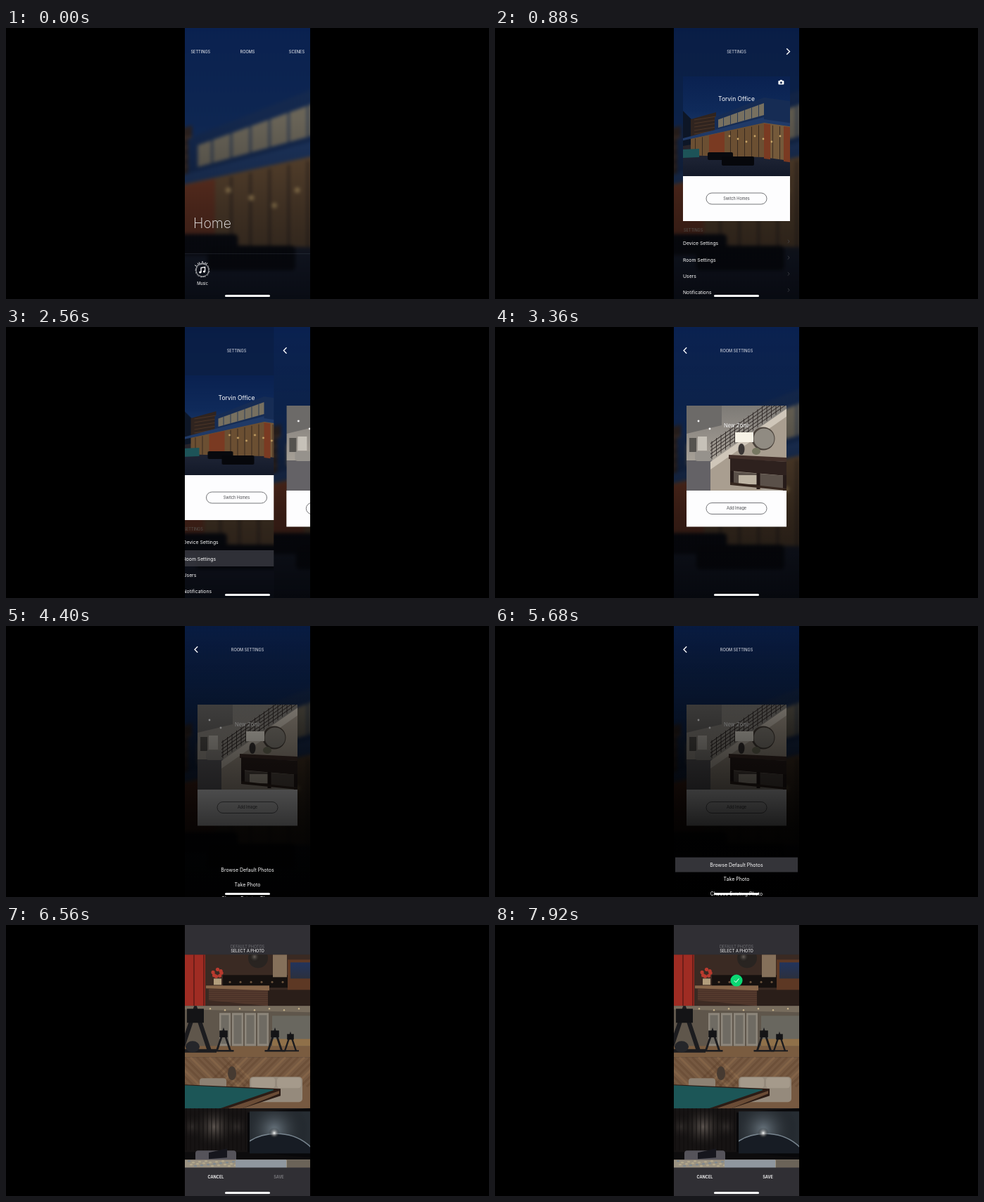
Animation, 686 px wide and 386 px high, one loop 8 s. Source, as an HTML page with a canvas:

```html
<!DOCTYPE html>
<html lang="en">
<head>
<meta charset="utf-8">
<title>Room photo setup</title>
<style>
html, body { margin: 0; width: 100%; height: 100%; overflow: hidden; background: #000; }
canvas { display: block; width: 686px; height: 386px; }
</style>
</head>
<body>
<canvas id="stage"></canvas>
<script>
const W = 686, H = 386, LOOP = 8000;
const L = 254, R = 432, PW = R - L, MID = 343;
const BAND = 73, PANEL = '#302f34';
const dpr = window.devicePixelRatio || 1;
const FONT = 'Inter, "Open Sans", sans-serif';

function surface(el) {
  el.width = W * dpr;
  el.height = H * dpr;
  const c = el.getContext('2d');
  c.scale(dpr, dpr);
  return c;
}
const view = surface(document.getElementById('stage'));
let g = view;

// Drawing helpers
const repeat = (n, fn) => { for (let i = 0; i < n; i++) fn(i); };

function rect(fill, x, y, w, h) {
  g.fillStyle = fill;
  g.fillRect(x, y, w, h);
}
// Upright-sided quad: top edge a0..a1, bottom edge b0..b1
function slab(fill, x0, x1, a0, a1, b0, b1) {
  g.fillStyle = fill;
  g.beginPath();
  g.moveTo(x0, a0);
  g.lineTo(x1, a1);
  g.lineTo(x1, b1);
  g.lineTo(x0, b0);
  g.fill();
}
function disc(fill, x, y, rx, ry = rx) {
  g.fillStyle = fill;
  g.beginPath();
  g.ellipse(x, y, rx, ry, 0, 0, 7);
  g.fill();
}
function line(color, width, ...p) {
  g.strokeStyle = color;
  g.lineWidth = width;
  g.beginPath();
  for (let i = 0; i < p.length; i += 2) g.lineTo(p[i], p[i + 1]);
  g.stroke();
}
function box(fill, x, y, w, h, r) {
  g.fillStyle = fill;
  g.beginPath();
  g.roundRect(x, y, w, h, r);
  g.fill();
}
function fade(y0, y1, ...stops) {
  const f = g.createLinearGradient(0, y0, 0, y1);
  stops.forEach((s, i) => f.addColorStop(i / (stops.length - 1), s));
  return f;
}
function glow(x, y, r, color) {
  const f = g.createRadialGradient(x, y, 0, x, y, r);
  f.addColorStop(0, color);
  f.addColorStop(1, 'rgba(0,0,0,0)');
  rect(f, x - r, y - r, 2 * r, 2 * r);
}
function text(str, x, y, size, color = '#fff', align = 'center', weight = 400) {
  g.font = `${weight} ${size}px ${FONT}`;
  g.textAlign = align;
  g.fillStyle = color;
  g.fillText(str, x, y + size * 0.36);
}
function clipped(x, y, w, h, paint) {
  g.save();
  g.beginPath();
  g.rect(x, y, w, h);
  g.clip();
  paint();
  g.restore();
}
function shifted(dx, dy, paint) {
  g.save();
  g.translate(dx, dy);
  paint();
  g.restore();
}
const put = (img) => g.drawImage(img, 0, 0, W, H);

function offscreen(paint) {
  const el = document.createElement('canvas');
  const outer = g;
  g = surface(el);
  paint();
  g = outer;
  return el;
}
function soft(blur, paint) {
  const sharp = offscreen(paint);
  return offscreen(() => {
    put(sharp);
    g.filter = `blur(${blur * dpr}px)`;
    put(sharp);
  });
}

// House: heights are given at the corner, edges run to the vanishing points
const CORNER = 382;
function edge(x, y) {
  const slope = x < CORNER ? 0.005 * (y - 99) - 0.4 : 0.14;
  return y + (x - CORNER) * slope;
}
function wall(fill, x0, x1, y0, y1) {
  slab(fill, x0, x1, edge(x0, y0), edge(x1, y0), edge(x0, y1), edge(x1, y1));
}
function house() {
  rect(fade(69, 165, '#0a2150', '#0f2a5a', '#223f70'), 267, 69, 152, 100);
  rect(fade(165, 211, '#2a2428', '#1c2233', '#131928'), 267, 165, 152, 46);
  slab('#0d1626', 267, 279, 118, 130, 168, 166);
  slab('#30241f', 278, 314, 130, 120, 160, 150);
  repeat(5, (i) => line('#553b2a', 0.8, 283, 131 + i * 5, 314, 126 + i * 5));
  wall('#6b4f32', 278, CORNER, 134, 184);
  wall('#74593a', CORNER, 419, 134, 184);
  wall('#162c54', 312, CORNER, 99, 134);
  wall('#162c54', CORNER, 419, 99, 132);
  wall('#777060', 317, CORNER, 107, 124);
  repeat(6, (i) => wall('#2a3a54', 324 + i * 10, 325 + i * 10, 107, 124));
  repeat(14, (i) => wall('#382a20', 284 + i * 10, 285 + i * 10, 137, 184));
  [304, CORNER, 410].forEach((x) => wall('#7a3a22', x, x + (x < CORNER ? 22 : 9), 136, 186));
  repeat(7, (i) => disc('#c9a567', 333 + i * 12, 154 + i % 3 * 4, 1.4));
  wall('#203a67', 267, CORNER, 127, 135);
  wall('#203a67', CORNER, 419, 130, 135);
  slab('#1d5358', 267, 290, 173, 172, 185, 184);
  box('#08090e', 302, 177, 36, 11, 2);
  box('#06070b', 322, 183, 46, 13, 2);
}
// The page backdrop is the same picture, enlarged and dimmed
function backdrop() {
  const zoom = H / 142;
  g.save();
  g.translate(MID, 0);
  g.scale(zoom, zoom);
  g.translate(-MID, -69);
  house();
  g.restore();
  rect(fade(0, H, 'rgba(0,0,0,0)', 'rgba(4,10,22,.12)', 'rgba(6,8,14,.45)', 'rgba(5,7,12,.7)'), 0, 0, W, H);
}

function stairs() {
  const rise = (x) => (306 - x) * 0.7;
  const flight = (fill, top, depth) =>
    slab(fill, 306, 414, top, top + rise(414), top + depth, top + depth + rise(414));
  rect(fade(112, 200, '#7d7a76', '#aca59b'), 272, 112, 142, 121);
  slab('#6c6a68', 272, 322, 112, 112, 152, 140);
  rect('#55534f', 276, 158, 10, 20);
  rect('#c6c1b8', 288, 156, 13, 20);
  repeat(2, (i) => disc('#fff', 289 + i * 16, 134 + i * 11, 1.4));
  rect('#646266', 272, 190, 62, 43);
  box('#96928c', 284, 177, 24, 14, 4);
  flight('#a99e90', 202, 80);
  flight('#cfc6b9', 192, 11);
  repeat(16, (i) => {
    const x = 308 + i * 6.5;
    line('#2a2321', 0.8, x, 190 + rise(x), x, 164 + rise(x));
  });
  repeat(5, (i) => line('#2a2321', 1, 306, 166 + i * 5, 414, 166 + i * 5 + rise(414)));
  disc('#4a423b', 381, 159, 16.5);
  disc('#908b82', 382, 159, 14.5);
  slab('#f7f2e6', 341, 367, 150, 150, 164, 164);
  disc('#3a3534', 350, 174, 4.5, 8);
  disc('#777761', 371, 177, 6, 5);
  slab('#43302a', 332, 414, 182, 186, 188, 192);
  slab('#2e211e', 334, 414, 187, 192, 205, 212);
  slab('#5a5049', 338, 414, 206, 212, 222, 231);
  rect('#beb4a4', 346, 211, 28, 13);
  repeat(3, (i) => rect('#261b19', 334 + i * 37.5, 205 + i * 3, 5, 20 + i * 3));
  slab('#36271f', 334, 414, 221, 230, 225, 233);
}

// Default photos, each in a band of its own
function kitchen() {
  rect('#3a2a23', 0, 0, PW, BAND);
  rect('#9f2c23', 0, 0, 29, BAND);
  repeat(2, (i) => line('#5c1a16', 1.5, 13 + i * 14, 0, 13 + i * 14, BAND));
  rect('#16110f', 54, 29, 94, 18);
  repeat(6, (i) => disc('#6f563f', 64 + i * 15, 39, 1.5));
  rect('#2a1e19', 118, 50, 60, 23);
  slab('#553a2e', 34, 118, 49, 50, 65, BAND);
  repeat(7, (i) => line('#452d24', 0.8, 34, 52 + i * 3, 118, 52 + i * 3));
  slab('#87664a', 30, 120, 44, 44, 48, 51);
  rect('#85705a', 125, 0, 20, 32);
  rect('#5d3824', 146, 7, 32, 43);
  rect(fade(11, 33, '#22345c', '#2b303f'), 150, 11, 28, 23);
  disc('#292421', 104, 5, 14);
  glow(99, 3, 8, 'rgba(170,160,150,.5)');
  rect('#b29d7c', 41, 34, 11, 9);
  repeat(7, (i) => disc('#b93a2e', 46 + 6 * Math.cos(i * 2.4), 26 + 5 * Math.sin(i * 2.4), 2.6));
}
function machine(x, size) {
  const y = 64;
  line('#1c1c1f', size / 12, x - size / 2, y, x + size / 2, y);
  line('#1c1c1f', size / 10, x - size / 3, y, x, y - size, x + size / 3, y);
  rect('#141416', x - size / 5, y - size, size / 2.5, size / 3);
}
function gym() {
  rect('#5f564b', 0, 0, PW, BAND);
  slab('#776c5d', 0, PW, 0, 0, 5, 9);
  repeat(7, (i) => disc('#c9b48c', 36 + i * 21, 4 + i % 2 * 2, 1.2));
  rect('#7a5c40', 0, 57, PW, 16);
  rect('#69675f', 124, 14, 54, 42);
  rect('#8f7049', 124, 47, 54, 10);
  repeat(4, (i) => {
    rect('#8d867b', 49 + i * 18, 10, 16, 47);
    rect('#6f6b63', 51.5 + i * 18, 13, 11, 41);
  });
  [[15, 60], [55, 29], [128, 29], [150, 24]].forEach(([x, size]) => machine(x, size));
  disc('#25262a', 11, 58, 10, 8);
}
function billiards() {
  rect('#765941', 0, 0, PW, BAND);
  repeat(30, (i) => {
    const x = i * 9 - 46;
    const lean = x < 64 ? 42 : -42;
    line(i % 3 ? 'rgba(80,52,32,.25)' : 'rgba(160,122,88,.3)', 3, x, 0, x + lean, 42);
  });
  box('#8d8173', 21, 30, 38, 16, 4);
  box('#958a7c', 92, 28, 75, 36, 5);
  repeat(2, (i) => box('#a59a8b', 94 + i * 37, 29, 34, 15, 4));
  disc('#463a31', 67, 23, 6, 10);
  slab('#2c1c15', 0, 136, 39, 45, 100, 55);
  slab('#6a4c36', 34, 134, 82, 48, 92, 52);
  slab('#1c5657', 0, 126, 40, 46, 90, 47);
}
function cinema() {
  rect('#161313', 0, 0, PW, BAND);
  repeat(3, (i) => glow(10 + i * 32, 26, i === 1 ? 34 : 20, `rgba(160,148,138,${i === 1 ? 0.5 : 0.2})`));
  repeat(15, (i) => line('rgba(16,13,13,.6)', 1.5, 2 + i * 6, 0, 2 + i * 6, 60));
  rect('#0d0c0d', 0, 62, PW, 11);
  slab('#08080a', 89, PW, 6, 0, 62, 70);
  clipped(92, 4, 86, 60, () => {
    rect('#262c32', 92, 4, 86, 60);
    glow(127, 30, 48, 'rgba(150,166,178,.6)');
    disc('#171c24', 130, 86, 62, 50);
    g.strokeStyle = '#77848e';
    g.lineWidth = 1.5;
    g.stroke();
    glow(127, 35, 8, '#fff');
  });
  box('#55535a', 15, 60, 58, 18, 4);
  slab('#16161d', 34, 60, 63, 57, 72, 70);
}
function bedroom() {
  rect('#9a9282', 0, 0, PW, 12);
  repeat(24, (i) => disc(i % 3 ? '#b3a98c' : '#7f8a90', 6 + i * 3, 2 + i * 5 % 8, 2, 1.3));
  rect('#8f979f', 72, 0, 72, 12);
  rect('#6b6358', 145, 0, 33, 12);
}

const art = {
  back: soft(2.4, backdrop),
  house: soft(0.5, house),
  stairs: soft(0.5, stairs),
  photos: soft(0.6, () => [kitchen, gym, billiards, cinema, bedroom].forEach((paint, i) => {
    shifted(L, 42.3 + i * BAND, () => clipped(0, 0, PW, BAND, paint));
  }))
};

// Screens
const chevron = (x, y, w, h, color, width) => line(color, width, x - w, y - h, x, y, x - w, y + h);

function button(label, y) {
  g.strokeStyle = '#55565a';
  g.lineWidth = 0.8;
  g.beginPath();
  g.roundRect(300, y - 8, 86, 16, 8);
  g.stroke();
  text(label, MID, y, 5.5, '#45464a');
}

function musicIcon(x, y) {
  repeat(32, (i) => {
    const a = i * Math.PI / 16;
    const r = 9.5 + (i > 18 && i < 28 ? 3.5 : 1) * Math.abs(Math.sin(i * 1.9));
    const c = Math.cos(a), s = Math.sin(a);
    line('#fff', 1, x + 8.3 * c, y + 8.3 * s, x + r * c, y + r * s);
  });
  line('#fff', 1.3, x - 2, y + 3, x - 2, y - 3.5, x + 3.6, y - 4.5, x + 3.6, y + 2);
  disc('#fff', x - 3.1, y + 3, 1.7, 1.4);
  disc('#fff', x + 2.5, y + 2, 1.7, 1.4);
}

function home() {
  text('SETTINGS', 262.5, 33.5, 5.6, '#fff', 'left');
  text('ROOMS', MID, 33.5, 5.6);
  text('SCENES', 424, 33.5, 5.6, '#fff', 'right');
  text('Home', 266, 278, 19.5, '#f0f0f2', 'left', 200);
  line('rgba(150,160,180,.16)', 0.8, L, 321.5, R, 321.5);
  musicIcon(279, 345);
  text('Music', 279, 364.5, 5.5);
}

function camera(x, y) {
  box('#fff', x - 4, y - 2.5, 8, 5.5, 1);
  rect('#fff', x - 1.6, y - 3.7, 3.2, 2);
  disc('#23365c', x, y + 0.2, 1.6);
}

function settings(pressed) {
  text('SETTINGS', MID, 33.5, 5.6, '#e8eaf0');
  chevron(418.5, 33.5, 4.3, 4.3, '#fff', 1.4);
  clipped(267, 69, 152, 142, () => put(art.house));
  text('Torvin Office', MID, 101, 8.5);
  camera(406.4, 77.6);
  rect('#fdfdfe', 267, 211, 152, 64);
  button('Switch Homes', 243);
  text('SETTINGS', 268, 288, 5.5, '#55534f', 'left');
  if (pressed) rect('rgba(62,62,70,.75)', L, 318, PW, 23);
  ['Device Settings', 'Room Settings', 'Users', 'Notifications'].forEach((s, i) => {
    const y = 307 + i * 23.1;
    text(s, 267, y, 6.8, '#fff', 'left');
    chevron(418, y - 3, 2, 2.4, '#4b4c52', 0.7);
  });
}

function roomSettings() {
  put(art.back);
  rect(fade(0, H, 'rgba(0,0,0,0)', 'rgba(0,0,0,.3)'), L, 0, PW, H);
  clipped(272, 112, 142, 121, () => put(art.stairs));
  text('New Zone', MID, 140.5, 7.5, '#f4f4f4');
  rect('#fdfdfe', 272, 233, 142, 51.5);
  button('Add Image', 258.5);
}

function roomHeader() {
  chevron(268, 33.5, -4.2, 4.3, '#fff', 1.3);
  text('ROOM SETTINGS', MID, 33.5, 5.6, '#e8eaf0');
}

function sheet(p, pressed) {
  g.save();
  g.globalAlpha = Math.min(1, p * 1.8);
  rect(fade(0, H, 'rgba(0,0,0,.2)', 'rgba(0,0,0,.42)', 'rgba(0,0,0,.68)', 'rgba(0,0,0,.9)', '#000'), L, 0, PW, H);
  g.restore();
  const y = 298 + 100 * (1 - p);
  if (pressed) rect('#343439', 256, y - 10.5, 174, 21);
  ['Browse Default Photos', 'Take Photo', 'Choose Existing Photo', 'Cancel'].forEach((s, i) => {
    text(s, MID, y + i * 20.7, 7);
  });
}

function picker(picked) {
  rect(PANEL, L, 0, PW, H);
  put(art.photos);
  rect(PANEL, L, 0, PW, 42);
  rect(PANEL, L, 345.5, PW, H);
  if (picked > 0) {
    g.save();
    g.globalAlpha = picked;
    disc('#0bd873', MID, 79, 8.6);
    line('#fff', 1, 339.8, 79.3, 342.2, 81.7, 346.4, 76.4);
    g.restore();
  }
  const ready = picked > 0.5;
  text('DEFAULT PHOTOS', MID, 30.8, 5.5, '#707074');
  text('SELECT A PHOTO', MID, 37, 5.6);
  text('CANCEL', 298, 358.5, 5.6, '#fff', 'center', 600);
  text('SAVE', 387.5, 358.5, 5.6, ready ? '#fff' : '#8c8c90', 'center', ready ? 600 : 500);
}

// Timeline
function ease(t, start, length) {
  const s = Math.min(1, Math.max(0, (t - start) / length));
  return s * s * (3 - 2 * s);
}
const page = (dx, dy, paint) => shifted(dx, dy, () => clipped(L, 0, PW, H, paint));

function draw(t) {
  const toSettings = ease(t, 280, 400);
  const toRoom = ease(t, 2390, 480);
  const sheetUp = ease(t, 4240, 320) - ease(t, 5538, 320);
  const toPicker = ease(t, 5920, 480);

  rect('#000', 0, 0, W, H);
  clipped(L, 0, PW, H, () => {
    if (toRoom < 1) {
      page(-PW * 0.3 * toRoom, 0, () => {
        put(art.back);
        rect(`rgba(0,0,0,${0.12 * toSettings})`, L, 0, PW, H);
        if (toSettings < 1) page(PW * toSettings, 0, home);
        if (toSettings > 0) page(PW * (toSettings - 1), 0, () => settings(t > 2200));
      });
    }
    if (toRoom > 0 && toPicker < 1) {
      page(PW * (1 - toRoom), 0, () => {
        roomSettings();
        if (sheetUp > 0) sheet(sheetUp, t > 5400);
        roomHeader();
      });
    }
    if (toPicker > 0) page(0, H * (1 - toPicker), () => picker(ease(t, 7400, 160)));
    box('#fff', 311, 380, 64, 3, 1.5);
  });
}

const began = performance.now();
function tick() {
  draw((performance.now() - began) % LOOP);
  requestAnimationFrame(tick);
}
tick();
</script>
</body>
</html>
```
